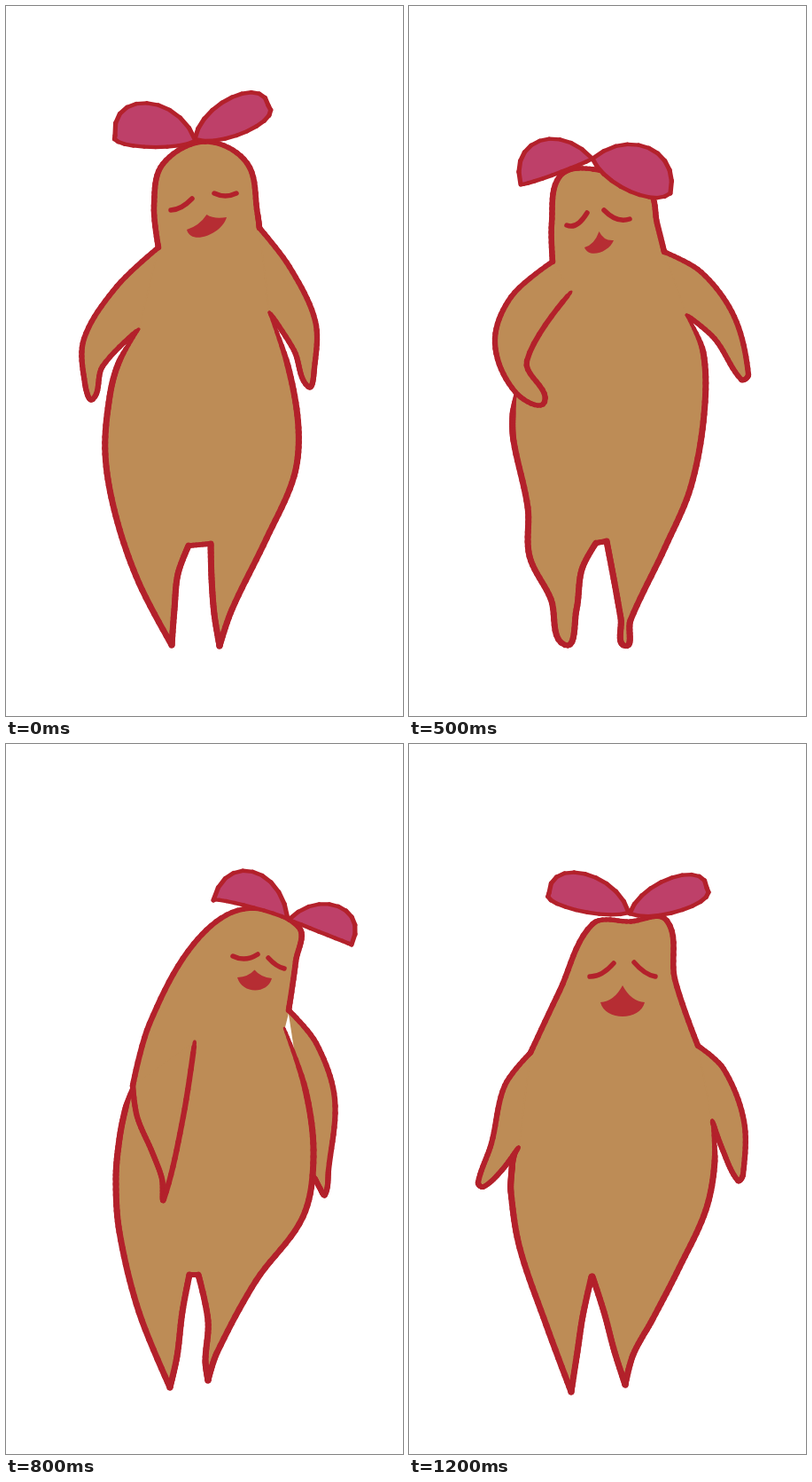
Recreate the animation shown at these times as an HTML page with a canvas. Size 448 by 800 pixels, loop 1.4 s.

```html
<!DOCTYPE html>
<html lang="en">
<head>
<meta charset="utf-8">
<title>Dancing sprout</title>
<style>
  html, body { margin: 0; width: 100%; height: 100%; overflow: hidden; background: #fff; }
  canvas { display: block; }
</style>
</head>
<body>
<canvas id="stage" width="448" height="800"></canvas>
<script>
const RED = '#b3212b', TAN = '#bd8c56', PINK = '#be4069', LIP = '#b62d33';
const LOOP = 1400, NECK_Y = 300;
const ctx = document.getElementById('stage').getContext('2d');
ctx.lineCap = ctx.lineJoin = 'round';

const points = text => text.split(' ').map(token => {
  const [x, y] = token.split(',').map(parseFloat);
  return { x, y, corner: token.endsWith('!') };
});

// Every pose uses the same joints in the same order, so poses can be blended.
// Marks begin with two end points: leaf + [outer bulge, inner bulge, roundness],
// eye + [sag], mouth + [peak, depth].
const pose = (head, armR, lower, armL, leaves, eyes, mouth) => ({
  head: points(head), armR: points(armR), lower: points(lower), armL: points(armL), leaves, eyes, mouth: [mouth]
});

const stand = pose(
  '172,272 167,225 177,178 225,153 272,177 284,235 286,250',
  '320,294 349,355 348,408 341,429 325,388 297,345',
  '297,345 318,405 330,475 325,530 294,600 255,680 241,721! 235,685 232,645 231,606! 206,608! 194,640 190,680 187,720! 150,650 124,575 112,505 117,440 128,400 150,364',
  '125,316 88,375 89,425 98,443 109,406 150,364',
  [[214, 152, 123, 146, 52, -14, 1.1], [213, 150, 296, 112, 34, -22, 1.1]],
  [[186, 230, 210, 217, 3], [235, 211, 260, 211, 3]],
  [204, 252, 249, 238, 10, 14]);

const lean = pose(
  '150,294 138,250 147,187 183,159 238,175 259,232 278,268',
  '320,298 354,350 364,420 359,438 332,395 306,362',
  '306,362 327,425 336,485 331,530 306,585 268,668 249,718! 232,685 222,645 221,610! 199,608! 187,645 197,692 190,716 158,680 132,630 132,572 117,500 127,425 151,364',
  '120,328 82,395 79,440 84,453 103,410 151,364',
  [[180, 163, 85, 176, 37, -26, 0.75], [179, 164, 236, 246, 36, -21, 0.75]],
  [[154, 263, 167, 251, 3], [184, 247, 211, 245, 3]],
  [171, 282, 206, 271, 10, 14]);

const hip = pose(
  '162,288 161,245 170,192 208,184 270,208 280,245 288,277',
  '330,300 367,350 383,415 375,421 345,375 313,348',
  '313,348 332,390 333,460 318,542 289,610 250,692 244,721 239,690 231,645 223,603! 211,605! 195,635 189,680 176,720 160,668 136,620 134,565 118,490 117,460 120,438',
  '115,328 97,380 120,435 153,446 133,400 183,322',
  [[207, 172, 126, 201, 52, -3, 0.95], [207, 172, 295, 211, 49, -22, 0.9]],
  [[178, 247, 201, 233, 6], [220, 230, 249, 240, 5]],
  [198, 272, 231, 264, 14, 10]);

const sway = pose(
  '143,385 162,315 212,225 268,186 330,206 327,245 319,300',
  '350,337 371,400 364,480 360,508 354,500 348,488',
  '314,320 338,390 347,465 335,533 282,605 238,686 228,717! 225,695 228,650 217,598! 207,598! 199,640 193,690 185,725! 150,640 128,550 124,490 128,445 135,410 143,385',
  '148,420 165,460 176,490 178,513 200,420 213,335',
  [[318, 197, 234, 176, 56, 4, 1], [319, 198, 390, 226, 46, 0, 1.05]],
  [[256, 239, 284, 237, 4], [296, 241, 314, 253, 2]],
  [261, 263, 300, 264, 9, 14]);

const bow = pose(
  '155,375 190,318 240,257 310,210 350,222 352,258 335,348',
  '355,372 368,415 360,470 354,490 350,492 348,490',
  '335,345 342,420 348,480 335,535 285,592 228,682 219,722! 212,705 213,650 209,596! 207,596! 200,645 190,685 168,728! 157,645 134,570 124,500 130,440 141,402 155,375',
  '158,408 180,448 207,485 217,502 218,430 203,338',
  [[342, 207, 285, 288, 20, -36, 0.95], [346, 210, 364, 300, 44, 3, 1.05]],
  [[272, 294, 306, 293, 5], [327, 299, 336, 316, 2]],
  [278, 323, 314, 334, 16, 8]);

const squat = pose(
  '137,348 170,278 207,203 250,200 291,199 300,265 326,340',
  '355,366 378,425 377,485 371,492 353,455 342,424',
  '342,424 345,470 335,525 305,590 275,648 253,688 244,722! 232,685 220,640 207,600! 206,600! 196,645 190,685 183,730! 155,655 125,568 115,505 116,480 118,465 124,454',
  '108,385 93,450 78,494 84,499 105,480 124,454',
  [[248, 190, 158, 168, 41, -15, 1.1], [249, 191, 336, 162, 31, -20, 1.1]],
  [[204, 262, 231, 247, 4], [254, 246, 278, 262, 3]],
  [216, 291, 266, 291, 19, 16]);

// Blend any matching values; flags come from the first.
function mix(a, b, k) {
  if (typeof a === 'number') return a + (b - a) * k;
  if (Array.isArray(a)) return a.map((v, i) => mix(v, b[i], k));
  if (typeof a === 'object') return Object.fromEntries(Object.keys(a).map(key => [key, mix(a[key], b[key], k)]));
  return a;
}

// Push everything above the neck sideways and down, in proportion to its height.
function bend(p, side, drop) {
  const move = (x, y) => {
    const up = Math.max(0, NECK_Y - y);
    return [x + side * up, y + drop * up];
  };
  const joint = j => {
    const [x, y] = move(j.x, j.y);
    return { ...j, x, y };
  };
  const mark = ([x1, y1, x2, y2, ...rest]) => [...move(x1, y1), ...move(x2, y2), ...rest];
  return Object.fromEntries(Object.entries(p).map(([key, list]) =>
    [key, list.map(item => Array.isArray(item) ? mark(item) : joint(item))]));
}

const steps = [
  [0, stand],
  [200, lean],
  [300, bend(lean, -0.1, 0.25)],
  [500, hip],
  [600, bend(mix(stand, sway, 0.5), 0, -0.16)],
  [800, sway],
  [900, bow],
  [1100, mix(bow, squat, 0.6)],
  [1200, squat]
];

function bezier(a, b, c, d) {
  return Array.from({ length: 11 }, (_, i) => {
    const t = i / 10, u = 1 - t;
    const at = key => u * u * u * a[key] + 3 * u * u * t * b[key] + 3 * u * t * t * c[key] + t * t * t * d[key];
    return { x: at('x'), y: at('y') };
  });
}

// Smooth open curve through the joints.
function curve(pts) {
  const handle = (i, reach) => {
    const p = pts[i], a = pts[i - 1], b = pts[i + 1];
    if (!a || !b || p.corner) return p;
    const len = Math.hypot(b.x - a.x, b.y - a.y) || 1;
    return { x: p.x + (b.x - a.x) / len * reach, y: p.y + (b.y - a.y) / len * reach };
  };
  return pts.slice(1).flatMap((q, i) => {
    const p = pts[i], reach = Math.hypot(q.x - p.x, q.y - p.y) / 3;
    return bezier(p, handle(i, reach), handle(i + 1, -reach), q);
  });
}

function fill(line, color) {
  ctx.beginPath();
  line.forEach(p => ctx.lineTo(p.x, p.y));
  ctx.closePath();
  ctx.fillStyle = ctx.strokeStyle = color;
  ctx.lineWidth = 1.5;
  ctx.fill();
  ctx.stroke();
}

// Brush line: steep strokes are heavier, and either end may thin out.
function ink(line, width, thinStart, thinEnd) {
  ctx.strokeStyle = RED;
  for (let i = 1; i < line.length; i++) {
    const a = line[i - 1], b = line[i], t = i / line.length;
    const len = Math.hypot(b.x - a.x, b.y - a.y) || 1;
    const ends = Math.min(thinStart ? t : 1, thinEnd ? 1 - t : 1);
    ctx.lineWidth = width * (1 + 0.25 * Math.abs(b.y - a.y) / len) * Math.min(1, 0.3 + 14 * ends);
    ctx.beginPath();
    ctx.moveTo(a.x, a.y);
    ctx.lineTo(b.x, b.y);
    ctx.stroke();
  }
}

function drawLeaf([x1, y1, x2, y2, outer, inner, round], side) {
  const dx = x2 - x1, dy = y2 - y1, len = Math.hypot(dx, dy);
  const at = (along, out) => ({ x: x1 + dx * along - side * dy / len * out, y: y1 + dy * along + side * dx / len * out });
  const edge = out => bezier(at(0, 0), at(0.25, out), at(round, out), at(1, 0));
  const line = [...edge(outer), ...edge(inner).reverse()];
  fill(line, PINK);
  ink(line, 4.2);
}

function drawEye([x1, y1, x2, y2, sag]) {
  ctx.strokeStyle = RED;
  ctx.lineWidth = 5.5;
  ctx.beginPath();
  ctx.moveTo(x1, y1);
  ctx.quadraticCurveTo((x1 + x2) / 2, (y1 + y2) / 2 + 2 * sag, x2, y2);
  ctx.stroke();
}

function drawMouth([x1, y1, x2, y2, peak, depth]) {
  const x = (x1 + x2) / 2, y = (y1 + y2) / 2, low = depth * 1.33;
  ctx.fillStyle = LIP;
  ctx.beginPath();
  ctx.moveTo(x1, y1);
  ctx.quadraticCurveTo((x1 + x) / 2 + 3, (y1 + y) / 2 - 1, x, y - peak);
  ctx.quadraticCurveTo((x2 + x) / 2 - 3, (y2 + y) / 2 - 1, x2, y2);
  ctx.bezierCurveTo(x2 - 5, y2 + low, x1 + 5, y1 + low, x1, y1);
  ctx.fill();
}

function draw(p) {
  const head = curve(p.head), lower = curve(p.lower);
  const arms = [[p.head[0], ...p.armL], [p.head[p.head.length - 1], ...p.armR]].map(curve);
  ctx.fillStyle = '#fff';
  ctx.fillRect(0, 0, 448, 800);
  [[...head, ...lower], ...arms].forEach(part => fill(part, TAN));
  ink(head, 5.2);
  ink(lower, 5.6, true, true);
  arms.forEach(arm => ink(arm, 5, false, true));
  p.eyes.forEach(drawEye);
  drawMouth(p.mouth[0]);
  drawLeaf(p.leaves[1], -1);
  drawLeaf(p.leaves[0], 1);
}

const start = performance.now();
let shown = null;

function tick() {
  const t = (performance.now() - start) % LOOP;
  const [, current] = steps.filter(([at]) => at <= t).pop() || steps[0];
  if (current !== shown) draw(shown = current);
  requestAnimationFrame(tick);
}
tick();
</script>
</body>
</html>
```
